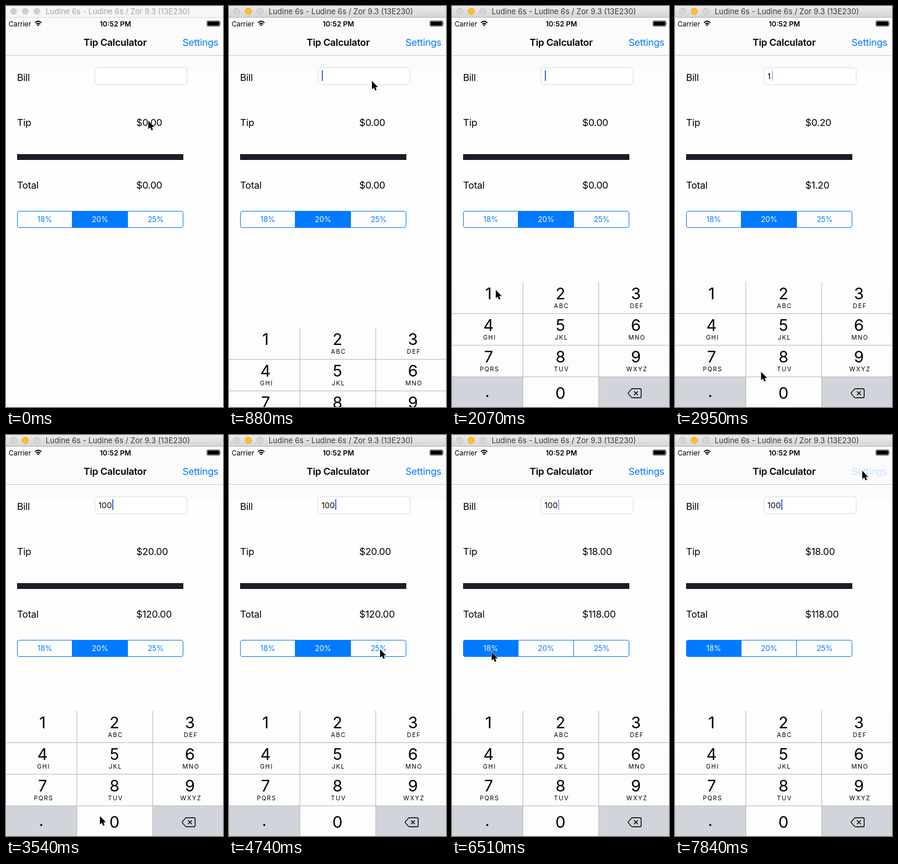
Recreate the animation shown at these times as an HTML page. Size 372 by 685 pixels, loop 7.99 s.

```html
<!DOCTYPE html>
<html lang="en">
<head>
<meta charset="utf-8">
<title>Tip Calculator</title>
<style>
html, body { margin: 0; width: 100%; height: 100%; overflow: hidden; background: #fefefe; }
svg { display: block; width: 372px; height: 685px; font: 16.5px Inter, "Open Sans", sans-serif; letter-spacing: -.25px; }
text { white-space: pre; }
.blue { fill: #007aff; }
.mid { text-anchor: middle; }
.small { font-size: 12.6px; letter-spacing: 0; }
.digit { font-size: 27.5px; letter-spacing: 0; }
.abc { font-size: 10.3px; letter-spacing: 1.5px; }
</style>
</head>
<body>
<svg viewBox="0 0 372 685">
  <defs>
    <linearGradient id="chrome" x2="0" y2="1"><stop stop-color="#ebebeb"/><stop offset="1" stop-color="#d4d4d4"/></linearGradient>
    <clipPath id="pill"><rect x="19" y="350" width="285" height="29" rx="4"/></clipPath>
  </defs>
  <rect y="20" width="372" height="90" fill="#fbfbfb"/>

  <rect id="bar" width="372" height="20"/>
  <path id="barLine" d="M0 19.5H372"/>
  <g id="dots"><circle cx="13" cy="9" r="5.5"/><circle cx="33" cy="9" r="5.5"/><circle cx="53" cy="9" r="5.5"/></g>
  <text id="title" x="68" y="14" style="font-size:13px;letter-spacing:0">Ludine 6s - Ludine 6s / Zor 9.3 (13E230)</text>

  <text x="4.5" y="34.5" style="font-size:11.8px;letter-spacing:0">Carrier</text>
  <g fill="none" stroke="#000" stroke-width="1.7">
    <path d="M49.6 28.6Q55.2 23.4 60.8 28.6M51.8 31Q55.2 28 58.6 31"/>
  </g>
  <path d="M53.2 32.4Q55.2 30.8 57.2 32.4L55.2 34.6Z"/>
  <text class="mid" x="187.5" y="34.5" font-weight="600" style="font-size:12px;letter-spacing:0">10:52 PM</text>
  <rect x="344.5" y="25.5" width="22" height="9" rx="1.5" fill="none" stroke="#000" stroke-width=".7"/>
  <path d="M345.5 26.5h20v7h-20zM367.5 28.5q1.6 1.5 0 3.5z"/>

  <text class="mid" x="187" y="68" font-weight="600">Tip Calculator</text>
  <text id="settings" class="blue" x="302.5" y="68">Settings</text>
  <path d="M0 84.5H372" stroke="#cacaca"/>

  <text x="19" y="128">Bill</text>
  <text x="19" y="204.5">Tip</text>
  <text x="19" y="311.5">Total</text>
  <text id="tip" x="223.3" y="204.5"></text>
  <text id="total" x="223.3" y="311.5"></text>
  <rect x="19" y="253" width="285" height="10" fill="#1f1e26"/>

  <rect x="152.5" y="105.5" width="158" height="29" rx="4.5" fill="#fff" stroke="#dcdcdc"/>
  <text id="bill" x="158.5" y="124.5" style="font-size:13.7px;letter-spacing:0"></text>
  <rect id="caret" y="110" width="2" height="18" fill="#426bf2"/>

  <g id="segments">
    <rect id="chosen" y="350" height="29" class="blue" clip-path="url(#pill)"/>
    <path d="M113.5 350V379M208.5 350V379" stroke="#007aff"/>
    <rect x="19.5" y="350.5" width="284" height="28" rx="3.5" fill="none" stroke="#007aff"/>
  </g>

  <g id="keyboard"></g>
  <path id="cursor" d="M0 0V14.3L3.3 11.3L5.5 16.4L8 15.3L5.9 10.4H10.3Z" stroke="#fff" stroke-width="1.1" paint-order="stroke"/>
</svg>
<script>
const LOOP = 7990, STEP = 148, LAST = 53;
const $ = id => document.getElementById(id);

function add(parent, tag, attrs, text = "") {
  const el = document.createElementNS("http://www.w3.org/2000/svg", tag);
  for (const k in attrs) el.setAttribute(k, attrs[k]);
  el.textContent = text;
  parent.append(el);
  return el;
}
function set(id, attrs) {
  for (const k in attrs) $(id).setAttribute(k, attrs[k]);
}

// Tip rate buttons
const rates = [18, 20, 25], edges = [19, 113, 208, 304];
const rateLabels = rates.map((r, i) =>
  add($("segments"), "text", { class: "mid small", x: [66.5, 161.3, 256.7][i], y: 369 }, r + "%"));

// Number pad
const GREY = "#d1d4db", WHITE = "#fdfdfd";
const cols = [0, 121.5, 251.5, 372], centres = [62.7, 186, 315.3];
const letters = ["", "ABC", "DEF", "GHI", "JKL", "MNO", "PQRS", "TUV", "WXYZ"];
const pad = $("keyboard"), keys = {};
[..."123456789.0<"].forEach((name, i) => {
  const c = i % 3, y = 471 + 54 * (i / 3 | 0);
  keys[name] = add(pad, "rect", { x: cols[c], y, width: cols[c + 1] - cols[c], height: 55, fill: ".<".includes(name) ? GREY : WHITE });
  if (name === "<") return;
  const dot = name === ".";
  add(pad, "text", { class: "mid digit", x: dot ? 60.5 : centres[c], y: i < 9 ? y + 30 : dot ? 668 : 670.5 }, name);
  if (letters[i]) add(pad, "text", { class: "mid abc", x: centres[c] + 1.8, y: y + 45 }, letters[i]);
});
add(pad, "path", { d: "M0 525.5H372M0 579.5H372M0 633.5H372M121.5 471V685M251.5 471V685", stroke: "#b9b9bb" });
add(pad, "path", {
  d: "M309.5 653.7H322Q324.3 653.7 324.3 656V667Q324.3 669.3 322 669.3H309.5Q308.3 669.3 307.5 668.4L302.3 662.4Q301.6 661.5 302.3 660.6L307.5 654.6Q308.3 653.7 309.5 653.7ZM312 658.2L318.6 664.8M318.6 658.2L312 664.8",
  fill: "none", stroke: "#000", "stroke-width": 1.4
});

// Pointer stops: step, x, y
const stops = [
  [0, 244, 196], [3, 245, 128], [8, 245, 128], [13, 75, 485], [17, 75, 485],
  [21, 161, 651], [24, 161, 651], [29, 262, 380], [30, 262, 380], [32, 259, 366],
  [36, 259, 366], [38, 256, 380], [42, 68, 371], [45, 68, 371], [46, 146, 363],
  [51, 321, 61], [54, 321, 61]
];
function pointer(n) {
  const i = stops.findIndex(s => s[0] > n);
  const [n0, x0, y0] = stops[i - 1], [n1, x1, y1] = stops[i];
  const u = (n - n0) / (n1 - n0), e = u * u * (3 - 2 * u);
  return [x0 + (x1 - x0) * e, y0 + (y1 - y0) * e];
}

const clamp = v => Math.max(0, Math.min(1, v));
const money = v => "$" + v.toFixed(2);

function caretAlpha(n) {
  if (n < 3) return 0;
  if (n < 6) return 1;
  const since = n < 16 ? 6 : n < 22 ? 16 : 24;
  const p = Math.max(0, n - since) * STEP / 1000 % 1;
  return p < .8 ? 1 - clamp((p - .5) / .15) : clamp((p - .92) / .08);
}

function draw(t) {
  const n = Math.min(LAST, Math.floor(t / STEP + .1));

  const active = n >= 2;
  set("bar", { fill: active ? "url(#chrome)" : "#f6f6f6" });
  set("barLine", { stroke: active ? "#b8b8b8" : "#dadada" });
  set("title", { fill: active ? "#3c3c3c" : "#a3a3a3" });
  [...$("dots").children].forEach((dot, i) => {
    const yellow = active && i === 1;
    dot.setAttribute("fill", yellow ? "#fdbe2e" : active ? "#d6d6d6" : "#cfcfcf");
    dot.setAttribute("stroke", yellow ? "#e5a935" : active ? "#c4c4c4" : "#d8d8d8");
  });

  const bill = n < 16 ? "" : n < 22 ? "1" : n < 23 ? "10" : "100";
  const pick = n < 33 ? 1 : n < 43 ? 2 : 0;
  const tip = bill * rates[pick] / 100;
  $("bill").textContent = bill;
  $("tip").textContent = money(tip);
  $("total").textContent = money(+bill + tip);
  set("caret", { x: 159 + [0, 7, 15, 23][bill.length], opacity: caretAlpha(n) });

  set("chosen", { x: edges[pick], width: edges[pick + 1] - edges[pick] });
  rateLabels.forEach((el, i) => el.setAttribute("fill", i === pick ? "#fff" : "#007aff"));

  const drop = n < 6 ? 220 : [78, 16, 2][n - 6] || 0;
  set("keyboard", { transform: `translate(0 ${drop})` });
  keys[1].setAttribute("fill", n === 15 || n === 16 ? GREY : WHITE);
  keys[0].setAttribute("fill", n === 22 || n === 23 ? GREY : WHITE);

  set("settings", { opacity: n >= 52 ? .2 : 1 });
  set("cursor", { transform: `translate(${pointer(n)})` });
}

function tick() {
  draw(performance.now() % LOOP);
  requestAnimationFrame(tick);
}
tick();
</script>
</body>
</html>
```
